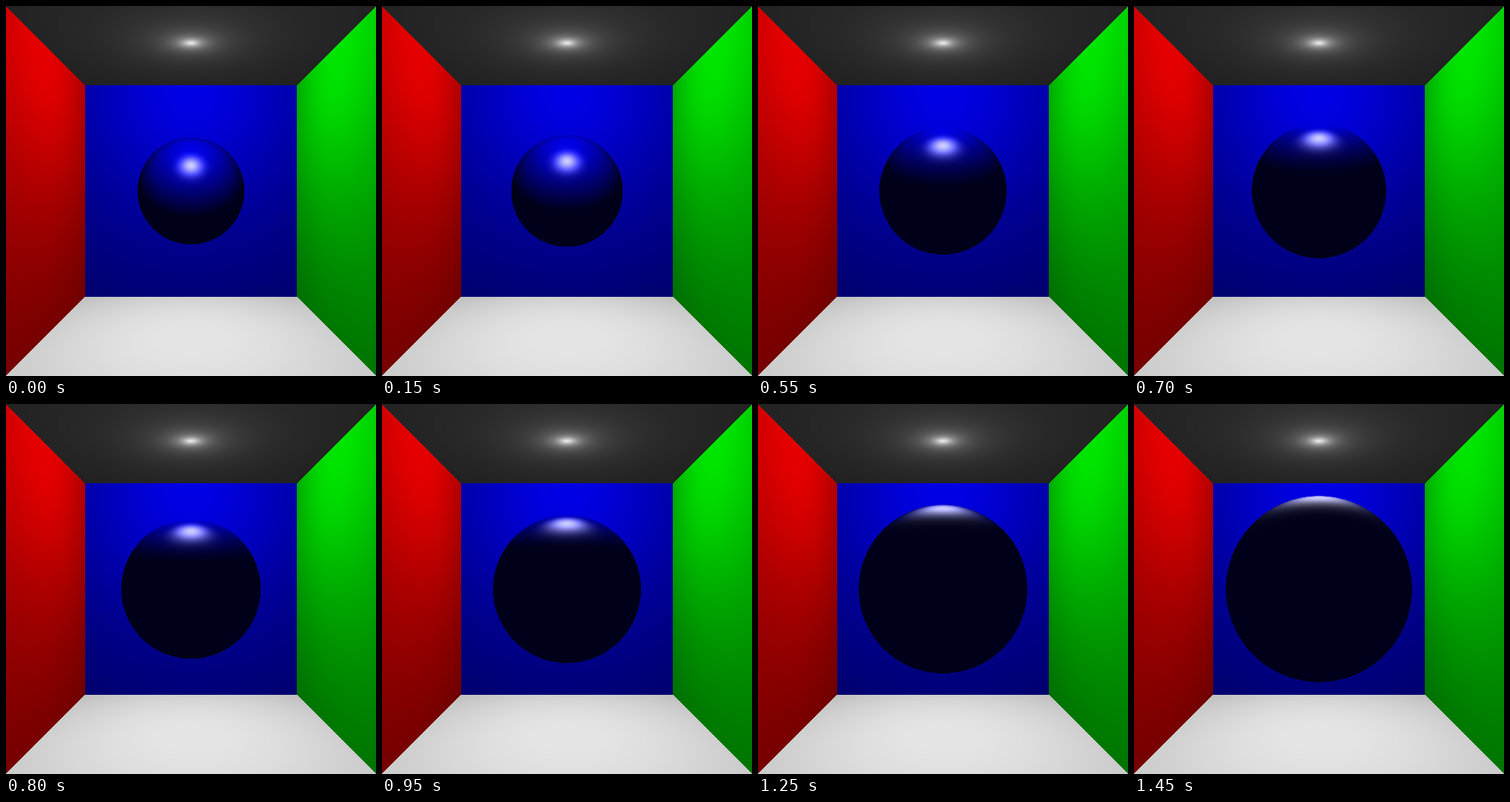
Recreate the animation shown at these times as an HTML page with a canvas. Size 500 by 500 pixels, loop 1500 ms.

```html
<!DOCTYPE html>
<html lang="en">
<head>
<meta charset="utf-8">
<title>Sphere in a box</title>
<style>
html, body { margin: 0; width: 100%; height: 100%; overflow: hidden; background: #000; }
canvas { display: block; width: 500px; height: 500px; }
</style>
</head>
<body>
<canvas id="stage" width="500" height="500"></canvas>
<script>
const SIZE = 500, FOCAL = 500;
const STEP = 50, STEPS = 30;
const HALF = 2, BACK = 7;            // room half-size, depth of the back wall
const LIGHT = { x: 0, y: 1.9, z: 5 };
const AMBIENT = 0.1, DIFFUSE = 0.8, SPECULAR = 0.8, SHINE = 10;

const ctx = document.getElementById('stage').getContext('2d');
const image = ctx.createImageData(SIZE, SIZE);
const room = new Uint8ClampedArray(image.data.length);

const slopeX = i => (i + 0.5 - SIZE / 2) / FOCAL;
const slopeY = j => -slopeX(j);

function put(buf, i, j, r, g, b) {
  const k = (j * SIZE + i) * 4;
  buf[k] = r * 255;
  buf[k + 1] = g * 255;
  buf[k + 2] = b * 255;
  buf[k + 3] = 255;
}

function shadeRoom(i, j) {
  const dx = slopeX(i), dy = slopeY(j);
  const ax = Math.abs(dx), ay = Math.abs(dy);
  const z = Math.min(BACK, HALF / Math.max(ax, ay));
  const lx = LIGHT.x - dx * z, ly = LIGHT.y - dy * z, lz = LIGHT.z - z;
  let color, facing;
  if (z === BACK) {
    color = [0, 0, 1];
    facing = -lz;
  } else if (ax > ay) {
    color = dx < 0 ? [1, 0, 0] : [0, 1, 0];
    facing = Math.abs(lx);
  } else {
    color = [1, 1, 1];
    facing = Math.abs(ly);
  }
  const lit = AMBIENT + DIFFUSE * facing / Math.hypot(lx, ly, lz);
  put(room, i, j, ...color.map(c => c * lit));
}

// Unit sphere on the view axis at the given depth, Phong shading.
function drawSphere(depth) {
  const c = depth * depth - 1;
  const reach = Math.ceil(FOCAL / Math.sqrt(c)) + 1;
  const from = SIZE / 2 - reach, to = SIZE / 2 + reach;
  for (let j = from; j < to; j++) {
    for (let i = from; i < to; i++) {
      const dx = slopeX(i), dy = slopeY(j);
      const a = dx * dx + dy * dy + 1;
      const disc = depth * depth - a * c;
      if (disc < 0) continue;
      const z = (depth - Math.sqrt(disc)) / a;
      const nx = dx * z, ny = dy * z, nz = z - depth;
      let lx = LIGHT.x - nx, ly = LIGHT.y - ny, lz = LIGHT.z - z;
      const len = Math.sqrt(lx * lx + ly * ly + lz * lz);
      lx /= len; ly /= len; lz /= len;
      const nl = nx * lx + ny * ly + nz * lz;
      const dist = Math.sqrt(a);
      const nv = -(nx * dx + ny * dy + nz) / dist;
      const vl = -(lx * dx + ly * dy + lz) / dist;
      const glint = SPECULAR * Math.pow(Math.max(0, 2 * nv * nl - vl), SHINE);
      put(image.data, i, j, glint, glint, AMBIENT + DIFFUSE * Math.max(0, nl) + glint);
    }
  }
}

for (let j = 0; j < SIZE; j++)
  for (let i = 0; i < SIZE; i++) shadeRoom(i, j);

let shown = -1;
function render(ms) {
  const step = Math.floor(ms / STEP) % STEPS;
  if (step === shown) return;
  shown = step;
  image.data.set(room);
  drawSphere(7 - step * 0.1);
  ctx.putImageData(image, 0, 0);
}

const start = performance.now();
function tick() {
  render(performance.now() - start);
  requestAnimationFrame(tick);
}
tick();
</script>
</body>
</html>
```
